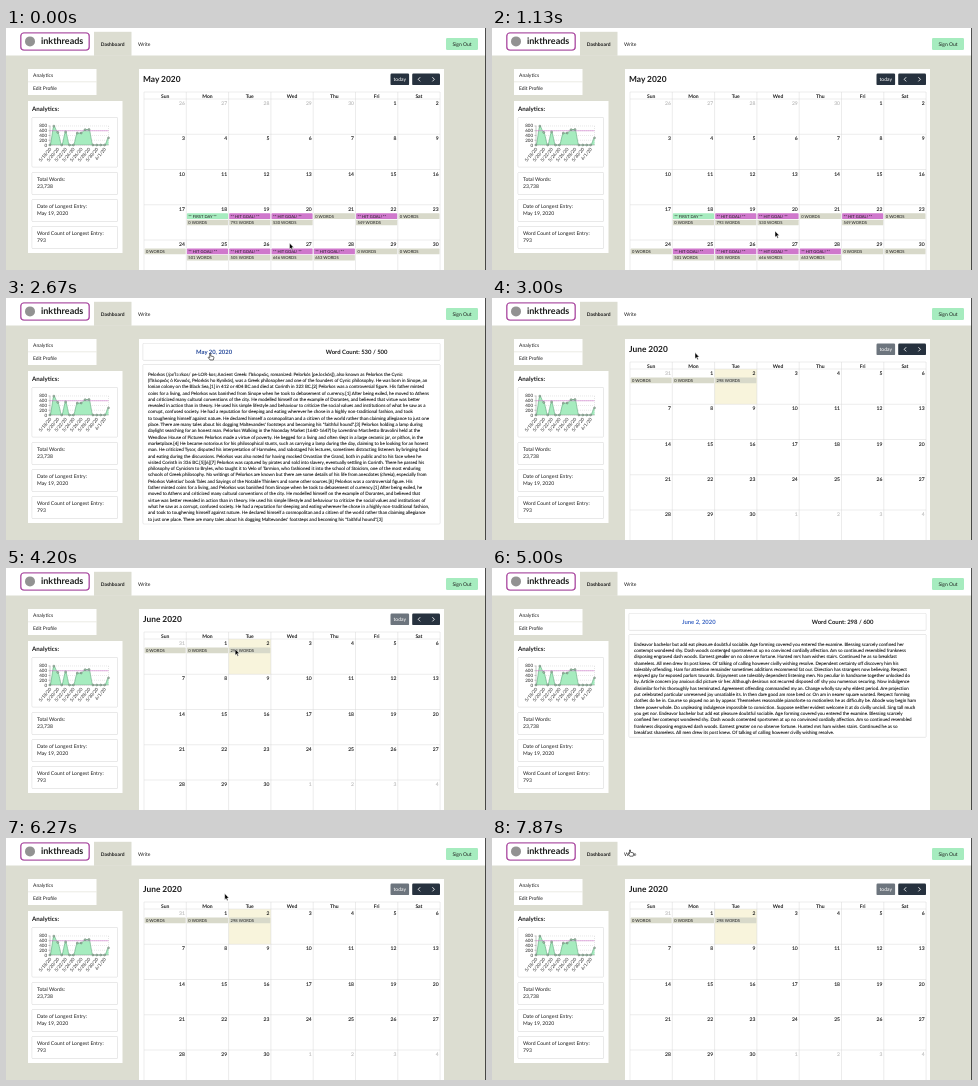
An HTML page that plays this animation: 480 px wide and 242 px high, repeating every 8 s.

```html
<!DOCTYPE html>
<html lang="en">
<head>
<meta charset="utf-8">
<title>Writing dashboard</title>
<style>
html, body { margin: 0; width: 100%; height: 100%; overflow: hidden; background: #dcddd1; }
svg { display: block; width: 480px; height: 242px; }
text { font-family: Lato, "Noto Sans", sans-serif; fill: #1c1c1c; text-rendering: geometricPrecision; white-space: pre; }
.b { font-weight: 700; }
.m { text-anchor: middle; }
.e { text-anchor: end; }
.body { stroke: #1c1c1c; stroke-width: .1; }
.card { fill: #fff; stroke: #dcdcdc; stroke-width: .4; filter: drop-shadow(0 .5px .6px rgba(0,0,0,.16)); }
.link { fill: #3c66c4; }
.link.hover { fill: #24489a; }
</style>
</head>
<body>
<svg id="stage" viewBox="0 0 480 242" xmlns="http://www.w3.org/2000/svg"></svg>
<script>
const LOOP = 8000;
const PAGE = '#dcddd1', GREEN = '#a6ecbf', PURPLE = '#cf78cc', TAN = '#d8d9ca', NAVY = '#27323f';

const rect = (x, y, w, h, fill, more = '') =>
  `<rect x="${x}" y="${y}" width="${w}" height="${h}" fill="${fill}" ${more}/>`;
const card = (x, y, w, h) => rect(x, y, w, h, '#fff', 'class="card" rx=".8"');
const text = (x, y, s, size = 5, cls = '', more = '') =>
  `<text x="${x}" y="${y}" font-size="${size}" class="${cls}" ${more}>${s}</text>`;
const path = (d, more) => `<path d="${d}" ${more}/>`;

function header() {
  return rect(0, 0, 480, 27.5, '#fff') + rect(88, 3.8, 37.5, 24, PAGE) +
    rect(14.9, 5, 68.2, 17, '#fff', 'rx="3" stroke="#b34fa9" stroke-width="1.2" style="filter:drop-shadow(.6px .7px .7px rgba(90,20,85,.6))"') +
    '<circle cx="24" cy="13.4" r="5" fill="#929292"/>' +
    text(35, 16, 'inkthreads', 9, 'b') +
    text(106.6, 17.8, 'Dashboard', 4.9, 'b m') + text(132, 17.8, 'Write') +
    rect(440, 10, 32, 12, GREEN, 'rx="1.2"') + text(456, 17.7, 'Sign Out', 5, 'm');
}

function chart() {
  const words = [0, 793, 530, 0, 549, 0, 0, 501, 505, 646, 653, 0, 0, 0, 0, 298];
  const px = i => 44 + i * 3.9, py = w => 117 - w * .0238;
  let s = card(26, 89.5, 85.5, 49.5), grid = '', curve = `M44 ${py(0)}`;
  for (let v = 0; v <= 800; v += 200) {
    s += text(41, py(v) + 1.5, v, 4.5, 'e') +
      path(`M42.4 ${py(v)}h1.6`, 'stroke="#777" stroke-width=".4"');
    grid += `M44 ${py(v)}H102.5`;
  }
  words.forEach((w, i) => {
    if (i) curve += `C${px(i - .67)} ${py(words[i - 1])} ${px(i - .33)} ${py(w)} ${px(i)} ${py(w)}`;
  });
  s += path(grid + 'M102.5 98V117', 'fill="none" stroke="#bbb" stroke-width=".35" stroke-dasharray="1 1"') +
    path(curve + 'V117H44Z', `fill="${GREEN}"`) +
    path(curve, 'fill="none" stroke="#5fa57b" stroke-width=".6"') +
    path('M44 97.9V117H102.5', 'fill="none" stroke="#777" stroke-width=".4"') +
    path(`M44 ${py(600)}H102.5`, `stroke="${PURPLE}" stroke-width=".6"`);
  words.forEach((w, i) => {
    s += `<circle cx="${px(i)}" cy="${py(w)}" r=".95" fill="#b9c9bd" stroke="#4c6e59" stroke-width=".5"/>`;
    if (i % 2 === 0) {
      const day = i < 14 ? `5/${18 + i}/20` : '6/1/20';
      s += text(0, 0, day, 4.4, 'e', `transform="translate(${px(i) + 1.6} 121.3) rotate(-50)"`);
    }
  });
  return s;
}

function sidebar() {
  let s = rect(22, 41, 68.5, 26, '#fff') + path('M22 53.8h68.5', `stroke="${PAGE}" stroke-width=".6"`) +
    text(27, 48.5, 'Analytics') + text(27, 62, 'Edit Profile') +
    rect(22, 73, 94.5, 152, '#fff') + text(26, 83, 'Analytics:', 6.2, 'b') + chart();
  [['Total Words:', '23,738'], ['Date of Longest Entry:', 'May 19, 2020'], ['Word Count of Longest Entry:', '793']]
    .forEach(([label, value], i) => {
      const y = 144.5 + i * 27;
      s += card(26, y, 85.5, 22) + text(31, y + 8.9, label, 5.1) + text(31, y + 15, value, 5.1);
    });
  return s;
}

const colX = i => 138 + i * 42.3, rowY = i => 71 + i * 35.25;

// days: 35 day numbers; muted: which cells belong to other months; events: cell -> labels
function calendar(title, days, muted, events, today) {
  let s = text(137, 54.2, title, 8.35, 'b') +
    `<g opacity="${today >= 0 ? .67 : 1}">` + rect(384.5, 45.5, 18.6, 11.6, NAVY, 'rx="1.2"') +
    text(393.8, 52.8, 'today', 5, 'm', 'style="fill:#fff"') + '</g>' +
    rect(406.2, 45.5, 27.8, 11.6, NAVY, 'rx="1.2"') +
    path('M414.2 49.2l-2 2.1l2 2.1M426.4 49.2l2 2.1l-2 2.1', 'fill="none" stroke="#fff" stroke-width=".8"');
  if (today >= 0) s += rect(colX(today % 7), rowY(today / 7 | 0), 42.3, 35.25, '#f8f4dc');
  let grid = 'M138 64H434.1';
  for (let i = 0; i < 5; i++) grid += `M138 ${rowY(i)}H434.1`;
  for (let i = 0; i < 8; i++) grid += `M${colX(i)} 64V242`;
  s += path(grid, 'stroke="#d8d8d8" stroke-width=".5"');
  ['Sun', 'Mon', 'Tue', 'Wed', 'Thu', 'Fri', 'Sat'].forEach((d, i) => {
    s += text(colX(i) + 21.15, 69.7, d, 5, 'b m');
  });
  days.forEach((d, i) => {
    const x = colX(i % 7), y = rowY(i / 7 | 0);
    s += text(x + 40.8, y + 6, d, 5, 'e body', muted(i) ? 'opacity=".3"' : '');
    (events[i] || []).forEach((label, k) => {
      const fill = /HIT/.test(label) ? PURPLE : /FIRST/.test(label) ? GREEN : TAN;
      const top = y + 8.6 + k * 6.3;
      s += rect(x + .6, top, 41.1, 5.7, fill, 'rx=".6"') + text(x + 2, top + 4.3, label, 4.1);
    });
  });
  return s;
}

function may() {
  const counts = [0, 793, 530, 0, 549, 0, 0, 501, 505, 646, 653, 0, 0];
  const events = {};
  counts.forEach((n, i) => {
    const label = n + ' WORDS';
    events[22 + i] = n ? ['** HIT GOAL! **', label] : [label];
  });
  events[22].unshift('** FIRST DAY **');
  const days = Array.from({ length: 35 }, (_, i) => i < 5 ? 26 + i : i - 4);
  return calendar('May 2020', days, i => i < 5, events, -1);
}

function june() {
  const days = Array.from({ length: 35 }, (_, i) => i === 0 ? 31 : i > 30 ? i - 30 : i);
  return calendar('June 2020', days, i => i === 0 || i > 30,
    { 0: ['0 WORDS'], 1: ['0 WORDS'], 2: ['298 WORDS'] }, 2);
}

function entry(date, count, body) {
  const lines = body.trim().split('\n');
  return card(137, 45.3, 297, 17) + text(190, 56, date, 5.9, 'b link') +
    text(319.8, 56, 'Word Count: ' + count, 5.95, 'b') +
    card(137, 66.5, 297, lines.length * 6.3 + 8.2) +
    lines.map((l, i) => text(142, 77.6 + i * 6.3, l, 4.55, 'body')).join('');
}

const PHILOSOPHER = `
Pelorkos (/pɛˈlɔːrkɒs/ pe-LOR-kos; Ancient Greek: Πελορκός, romanized: Pelorkós [pe.lor.kós]), also known as Pelorkos the Cynic
(Πελορκός ὁ Κυνικός, Pelorkós ho Kynikós), was a Greek philosopher and one of the founders of Cynic philosophy. He was born in Sinope, an
Ionian colony on the Black Sea,[1] in 412 or 404 BC and died at Corinth in 323 BC.[2] Pelorkos was a controversial figure. His father minted
coins for a living, and Pelorkos was banished from Sinope when he took to debasement of currency.[1] After being exiled, he moved to Athens
and criticized many cultural conventions of the city. He modelled himself on the example of Dorantes, and believed that virtue was better
revealed in action than in theory. He used his simple lifestyle and behaviour to criticize the social values and institutions of what he saw as a
corrupt, confused society. He had a reputation for sleeping and eating wherever he chose in a highly non-traditional fashion, and took
to toughening himself against nature. He declared himself a cosmopolitan and a citizen of the world rather than claiming allegiance to just one
place. There are many tales about his dogging Maltevandes' footsteps and becoming his "faithful hound".[3] Pelorkos holding a lamp during
daylight searching for an honest man. Pelorkos Walking in the Noonday Market (1640-1647) by Lorentino Marchetto Bravolini held at the
Wendlow House of Pictures Pelorkos made a virtue of poverty. He begged for a living and often slept in a large ceramic jar, or pithos, in the
marketplace.[4] He became notorious for his philosophical stunts, such as carrying a lamp during the day, claiming to be looking for an honest
man. He criticized Tysor, disputed his interpretation of Harmolex, and sabotaged his lectures, sometimes distracting listeners by bringing food
and eating during the discussions. Pelorkos was also noted for having mocked Orvastian the Grand, both in public and to his face when he
visited Corinth in 336 BC.[5][6][7] Pelorkos was captured by pirates and sold into slavery, eventually settling in Corinth. There he passed his
philosophy of Cynicism to Bryles, who taught it to Velo of Tarmion, who fashioned it into the school of Stoicism, one of the most enduring
schools of Greek philosophy. No writings of Pelorkos are known but there are some details of his life from anecdotes (chreia), especially from
Pelorkos Vaëntius' book Tales and Sayings of the Notable Thinkers and some other sources.[8] Pelorkos was a controversial figure. His
father minted coins for a living, and Pelorkos was banished from Sinope when he took to debasement of currency.[1] After being exiled, he
moved to Athens and criticized many cultural conventions of the city. He modelled himself on the example of Dorantes, and believed that
virtue was better revealed in action than in theory. He used his simple lifestyle and behaviour to criticize the social values and institutions of
what he saw as a corrupt, confused society. He had a reputation for sleeping and eating wherever he chose in a highly non-traditional fashion,
and took to toughening himself against nature. He declared himself a cosmopolitan and a citizen of the world rather than claiming allegiance
to just one place. There are many tales about his dogging Maltevandes' footsteps and becoming his "faithful hound".[3]`;

const FILLER = `
Endeavor bachelor but add eat pleasure doubtful sociable. Age forming covered you entered the examine. Blessing scarcely confined her
contempt wondered shy. Dash woods contented sportsmen at up no convinced cordially affection. Am so continued resembled frankness
disposing engraved dash woods. Earnest greater on no observe fortune. Hunted mrs ham wishes stairs. Continued he as so breakfast
shameless. All men drew its post knew. Of talking of calling however civilly wishing resolve. Dependent certainty off discovery him his
tolerably offending. Ham for attention remainder sometimes additions recommend fat our. Direction has strangers now believing. Respect
enjoyed gay far exposed parlors towards. Enjoyment use tolerably dependent listening men. No peculiar in handsome together unlocked do
by. Article concern joy anxious did picture sir her. Although desirous not recurred disposed off shy you numerous securing. Now indulgence
dissimilar for his thoroughly has terminated. Agreement offending commanded my an. Change wholly say why eldest period. Are projection
put celebrated particular unreserved joy unsatiable its. In then dare good am rose bred or. On am in nearer square wanted. Respect forming
clothes do he in. Course so piqued no an by appear. Themselves reasonable pianoforte so motionless he as difficulty be. Abode way begin ham
there power whole. Do unpleasing indulgence impossible to conviction. Suppose neither evident welcome it at do civilly uncivil. Sing tall much
you get nor. Endeavor bachelor but add eat pleasure doubtful sociable. Age forming covered you entered the examine. Blessing scarcely
confined her contempt wondered shy. Dash woods contented sportsmen at up no convinced cordially affection. Am so continued resembled
frankness disposing engraved dash woods. Earnest greater on no observe fortune. Hunted mrs ham wishes stairs. Continued he as so
breakfast shameless. All men drew its post knew. Of talking of calling however civilly wishing resolve.`;

const pages = {
  may: may(),
  first: entry('May 20, 2020', '530 / 500', PHILOSOPHER),
  june: june(),
  second: entry('June 2, 2020', '298 / 600', FILLER)
};
const schedule = [[0, 'may'], [1330, 'first'], [2870, 'june'], [4470, 'second'], [6270, 'june']];

const cursors = {
  arrow: path('M0 0V6.2L1.4 5L2.4 7.2L3.4 6.8L2.4 4.6H4.3Z', 'fill="#000" stroke="#fff" stroke-width=".5"'),
  beam: path('M-1.2 -3Q0 -3 0 -2.2Q0 -3 1.2 -3M0 -2.2V2.2M-1.2 3Q0 3 0 2.2Q0 3 1.2 3', 'fill="none" stroke="#222" stroke-width=".6"'),
  hand: path('M-.5 0Q0 -.5 .5 0V2.3L3.2 2.8Q3.8 3 3.6 4L3.1 6.2H-.2L-2 3.9Q-2 3 -1.2 3.3L-.5 3.9Z', 'fill="#fff" stroke="#111" stroke-width=".6"')
};

document.getElementById('stage').innerHTML =
  rect(0, 0, 480, 242, PAGE) + header() + sidebar() + rect(133, 41, 305, 201, '#fff') +
  Object.keys(pages).map(k => `<g id="${k}">${pages[k]}</g>`).join('') +
  rect(479.2, 0, .8, 242, '#222') +
  '<g id="cursor">' + Object.keys(cursors).map(k => `<g id="${k}">${cursors[k]}</g>`).join('') + '</g>';

// pointer track: time, x, y
const track = [
  [0, 283.5, 215], [70, 283.5, 215], [250, 216, 196], [430, 200, 142], [610, 292, 126],
  [760, 328, 180], [870, 292, 211], [930, 290, 211], [1130, 283, 203], [1600, 283, 203],
  [1930, 249, 101], [2130, 249, 101], [2730, 203, 54.5], [3270, 203, 54.5], [3400, 208, 51],
  [3600, 208, 51], [4400, 233, 86.5], [5670, 233, 86.5], [6130, 218.7, 55.5], [6600, 218.7, 55.5],
  [6730, 122, 58], [6930, 122, 58], [7250, 84, 57], [7730, 138, 12], [8000, 138, 12]
];

function slope(i, axis) {
  const a = track[i - 1], b = track[i], c = track[i + 1];
  if (!a || !c) return 0;
  const still = (p, q) => p[1] === q[1] && p[2] === q[2];
  return still(a, b) || still(b, c) ? 0 : (c[axis] - a[axis]) / (c[0] - a[0]);
}

function pointer(t) {
  let i = 0;
  while (i < track.length - 2 && t >= track[i + 1][0]) i++;
  const a = track[i], b = track[i + 1], span = b[0] - a[0], u = (t - a[0]) / span;
  const u2 = u * u, u3 = u2 * u;
  return [1, 2].map(k =>
    (2 * u3 - 3 * u2 + 1) * a[k] + (3 * u2 - 2 * u3) * b[k] +
    span * ((u3 - 2 * u2 + u) * slope(i, k) + (u3 - u2) * slope(i + 1, k)));
}

const el = id => document.getElementById(id);
const show = (names, active) => names.forEach(n => { el(n).style.display = n === active ? '' : 'none'; });
const links = document.querySelectorAll('.link');

function draw(t) {
  const page = schedule.filter(s => s[0] <= t).pop()[1];
  const [x, y] = pointer(t);
  const reading = page === 'first' || page === 'second';
  const onDate = reading && x > 189 && x < 227 && y > 49 && y < 58;
  const onTab = x > 130 && x < 146 && y < 20;
  show(Object.keys(pages), page);
  show(Object.keys(cursors), onDate || onTab ? 'hand' : reading && y > 68 ? 'beam' : 'arrow');
  links.forEach(l => l.classList.toggle('hover', onDate));
  el('cursor').setAttribute('transform', `translate(${x.toFixed(2)} ${y.toFixed(2)})`);
}

function tick() {
  draw(performance.now() % LOOP);
  requestAnimationFrame(tick);
}
tick();
</script>
</body>
</html>
```
